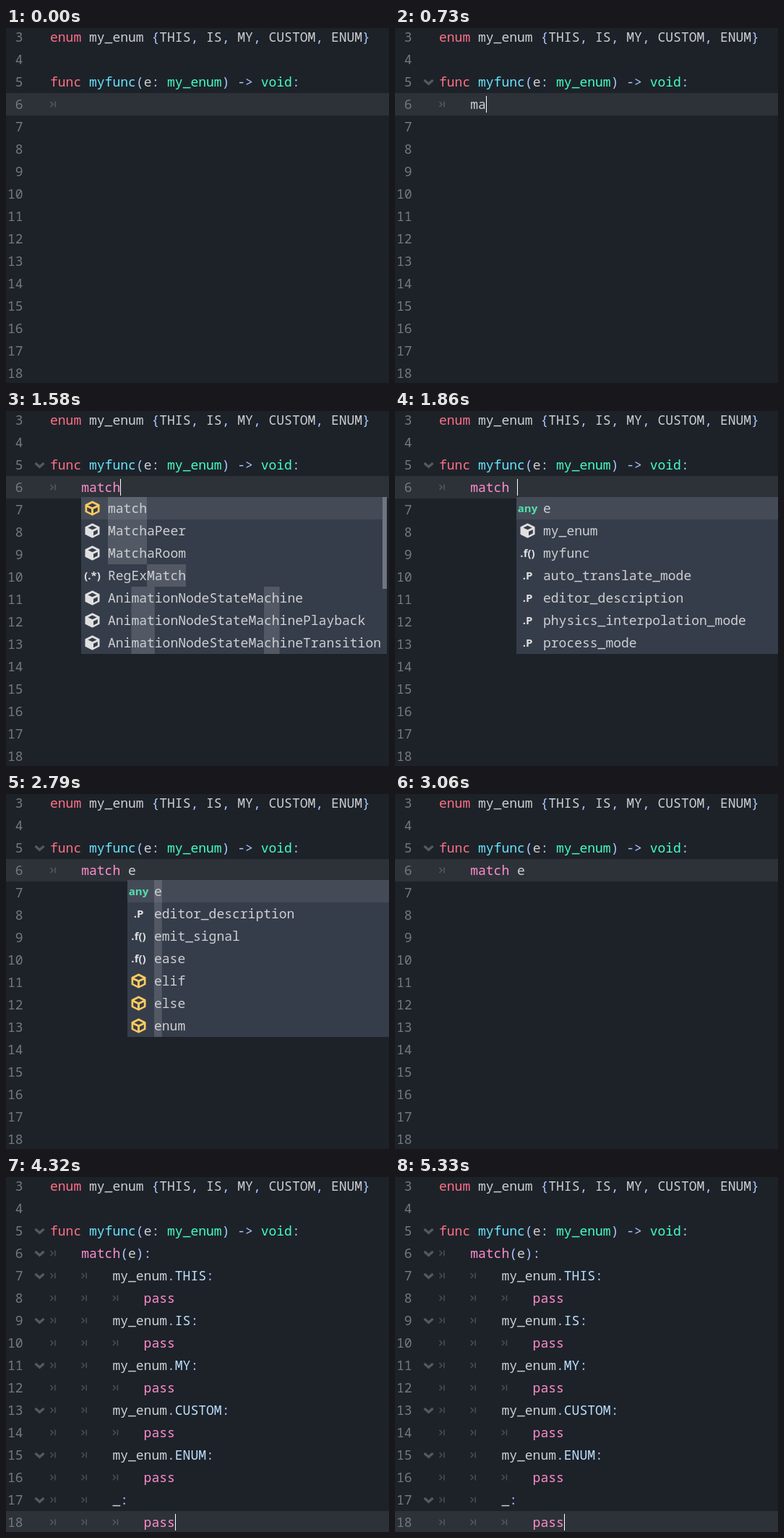
Animation of 530x491 px, one loop 5400 ms. Source, as an HTML page:

```html
<!DOCTYPE html>
<html lang="en">
<head>
<meta charset="utf-8">
<title>Code editor</title>
<style>
html, body { margin: 0; width: 100%; height: 100%; overflow: hidden; background: #1d2229; }
svg { display: block; width: 530px; height: 491px; }
text { font: 18px "Noto Sans Mono", monospace; white-space: pre; font-variant-ligatures: none; }
.icon { font: 700 15px "Open Sans", sans-serif; text-anchor: middle; }
</style>
</head>
<body>
<svg id="stage" viewBox="0 0 530 491"></svg>
<script>
const LOOP = 5400, CHAR = 10.8, ROW = 31, LEFT = 61, FIRST = 3, LAST = 18;
const COLOR = {
  text: '#cdcfd2', symbol: '#abc9ff', keyword: '#ff7085', control: '#ff8ccc',
  type: '#42ffc2', func: '#66e6ff', member: '#bce0ff', number: '#75797e',
  popup: '#363d4a', yellow: '#ffca5f', any: '#53dfad', icon: '#e0e0e0'
};
const stage = document.getElementById('stage');

const HEAD = ['enum my_enum {THIS, IS, MY, CUSTOM, ENUM}', '', 'func myfunc(e: my_enum) -> void:'];
const BRANCHES = ['my_enum.THIS', 'my_enum.IS', 'my_enum.MY', 'my_enum.CUSTOM', 'my_enum.ENUM', '_'];
const FILLED = ['\tmatch(e):', ...BRANCHES.flatMap(b => [`\t\t${b}:`, '\t\t\tpass'])];

// Popup items: [icon, label, [start, length] of each marked run]
const MATCH_LIST = {
  x: 104, right: 527, bar: true, items: [
    ['key', 'match', [0, 5]], ['cube', 'MatchaPeer', [0, 5]], ['cube', 'MatchaRoom', [0, 5]],
    ['(.*)', 'RegExMatch', [5, 5]],
    ...['', 'Playback', 'Transition'].map(s => ['cube', 'AnimationNodeStateMachine' + s, [3, 3], [20, 2]])
  ]
};
const ALL_LIST = {
  x: 168, right: 530, items: [
    ['any', 'e'], ['cube', 'my_enum'], ['.f()', 'myfunc'], ['.P', 'auto_translate_mode'],
    ['.P', 'editor_description'], ['.P', 'physics_interpolation_mode'], ['.P', 'process_mode']
  ]
};
const E_LIST = {
  x: 168, right: 530, items: [
    ['any', 'e'], ['.P', 'editor_description'], ['.f()', 'emit_signal'], ['.f()', 'ease'],
    ['key', 'elif'], ['key', 'else'], ['key', 'enum']
  ].map(item => [...item, [0, 1]])
};

// Each step: start time and what changes from the step before
const STEPS = [
  [0, { typed: '', caret: false, popup: null, fold: false, filled: false }],
  [70, { caret: true }],
  [530, { caret: false }],
  [600, { typed: 'm', caret: true, fold: true }],
  [730, { typed: 'ma' }],
  [930, { typed: 'mat' }],
  [1190, { typed: 'matc' }],
  [1320, { typed: 'match' }],
  [1580, { popup: MATCH_LIST }],
  [1860, { typed: 'match ', popup: ALL_LIST }],
  [2260, { caret: false }],
  [2390, { typed: 'match e', popup: E_LIST, caret: true }],
  [2790, { caret: false }],
  [3060, { popup: null }],
  [3330, { caret: true }],
  [3400, { filled: true }],
  [3790, { caret: false }],
  [4320, { caret: true }],
  [4780, { caret: false }],
  [5330, { caret: true }]
];

const rowTop = n => 90 + ROW * (n - 6);
const rect = (x, y, w, h, fill, alpha = 1) =>
  `<rect x="${x}" y="${y}" width="${w}" height="${h}" fill="${fill}" fill-opacity="${alpha}"/>`;
const text = (x, y, body, fill, extra = '') => `<text x="${x}" y="${y}" fill="${fill}" ${extra}>${body}</text>`;
const path = (d, stroke, width) => `<path d="${d}" fill="none" stroke="${stroke}" stroke-width="${width}"/>`;
const escape = s => s.replace(/</g, '&lt;').replace(/>/g, '&gt;');

function tokenColor(word, prev, before) {
  if (/^\W/.test(word)) return COLOR.symbol;
  if (/^(func|enum)$/.test(word)) return COLOR.keyword;
  if (/^(match|pass)$/.test(word)) return COLOR.control;
  if (word === 'void' || prev === ': ') return COLOR.type;
  if (before === 'func') return COLOR.func;
  return prev === '.' ? COLOR.member : COLOR.text;
}

function codeLine(n, line) {
  const tabs = line.lastIndexOf('\t') + 1;
  const y = rowTop(n);
  let out = '';
  for (let i = 0; i < tabs; i++) {
    const x = LEFT + i * 4 * CHAR;
    out += path(`M${x + .5} ${y + 12}l3.5 3.5l-3.5 3.5M${x + 7} ${y + 11.5}v8`, 'rgba(205,207,210,.25)', 1.6);
  }
  const tokens = line.slice(tabs).match(/\w+|\W+/g) || [];
  const spans = tokens.map((t, i) =>
    `<tspan fill="${tokenColor(t, tokens[i - 1], tokens[i - 2])}">${escape(t)}</tspan>`).join('');
  return out + text(LEFT + tabs * 4 * CHAR, y + 22, spans, COLOR.text);
}

const foldArrow = n => path(`M40.5 ${rowTop(n) + 13}l6 5.2l6 -5.2`, '#55595e', 3.4);

function cube(cx, cy, key) {
  const color = key ? COLOR.yellow : COLOR.icon;
  const face = d => `<path d="${d}" fill="${COLOR.popup}"/>`;
  return `<g transform="translate(${cx} ${cy})">
    <path d="M0 -9L9 -4.7V4.7L0 9L-9 4.7V-4.7Z" fill="${color}" stroke="${color}" stroke-width="2" stroke-linejoin="round"/>
    ${face('M0 -7L6 -4L0 -1.2L-6 -4Z')}${face('M1.5 1.3L7.3 -1.6V3.8L1.5 6.7Z')}
    ${key ? face('M-1.5 1.3L-7.3 -1.6V3.8L-1.5 6.7Z') : ''}</g>`;
}

function icon(kind, cx, cy) {
  if (kind === 'key' || kind === 'cube') return cube(cx, cy, kind === 'key');
  return text(cx, cy + 5, kind, kind === 'any' ? COLOR.any : COLOR.icon, 'class="icon"');
}

function popupBox({ x, right, bar, items }) {
  const top = 119, inner = right - (bar ? 6 : 0);
  let out = rect(x, top, right - x, ROW * items.length, COLOR.popup) + rect(x, top, inner - x, ROW, '#fff', .07);
  items.forEach(([kind, label, ...marks], i) => {
    const y = top + i * ROW;
    for (const [start, len] of marks) out += rect(x + 37 + start * CHAR, y, len * CHAR, ROW, '#fff', .14);
    out += icon(kind, x + 15.5, y + 15.5) + text(x + 37, y + 22, label, COLOR.text);
  });
  return out + (bar ? rect(inner, top, 6, 127, '#fff', .29) : '');
}

function draw({ typed, caret, popup, fold, filled }) {
  const lines = [...HEAD, ...(filled ? FILLED : ['\t' + typed])];
  const row = filled ? LAST : 6;
  const column = filled ? 16 : 4 + typed.length;
  let out = rect(0, 0, 530, 491, '#1d2229') + rect(0, rowTop(row), 530, ROW, '#fff', .07);
  for (let n = FIRST; n <= LAST; n++)
    out += text(23.6, rowTop(n) + 22, n, COLOR.number, 'text-anchor="end"');
  lines.forEach((line, i) => {
    out += codeLine(FIRST + i, line);
    if (fold && i > 0 && line.endsWith(':')) out += foldArrow(FIRST + i);
  });
  if (caret) out += rect(Math.round(LEFT + column * CHAR), rowTop(row) + 4, 1, 23, '#fff');
  if (popup) out += popupBox(popup);
  stage.innerHTML = out;
}

let shown = 0;
function tick(now) {
  const t = now % LOOP;
  const count = STEPS.filter(([start]) => start <= t).length;
  if (count !== shown) {
    shown = count;
    draw(Object.assign({}, ...STEPS.slice(0, count).map(s => s[1])));
  }
  requestAnimationFrame(tick);
}
const begin = performance.now();
tick(0);
requestAnimationFrame(function loop() {
  tick = () => {
    const t = Math.max(0, performance.now() - begin) % LOOP;
    const count = STEPS.filter(([start]) => start <= t).length;
    if (count !== shown) draw(Object.assign({}, ...STEPS.slice(0, shown = count).map(s => s[1])));
    requestAnimationFrame(tick);
  };
  tick();
});
</script>
</body>
</html>
```
